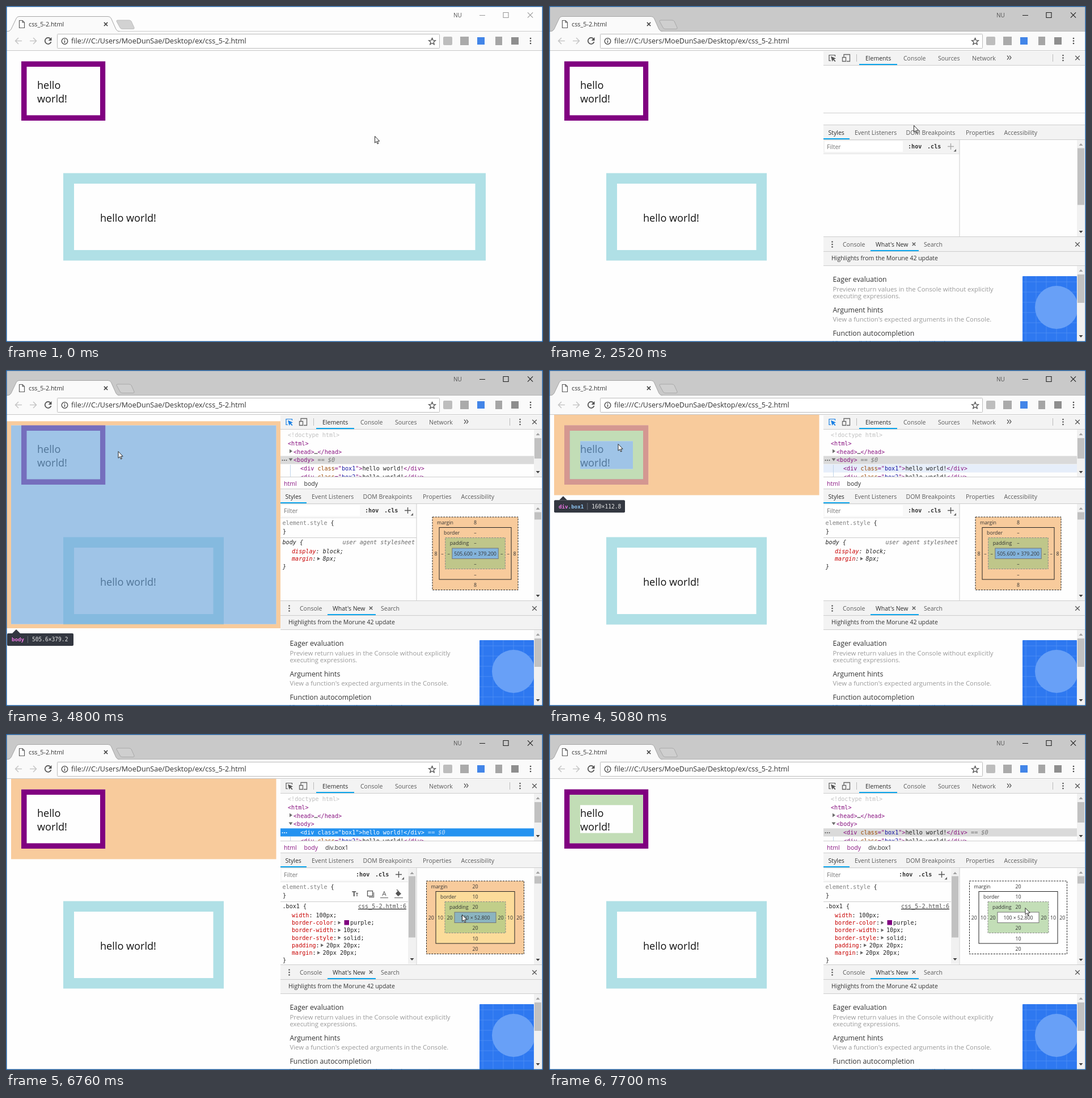
Write an HTML page that moves like this. It is 947 px wide and 592 px high and loops after 8000 ms.

```html
<!DOCTYPE html>
<html lang="en">
<head>
<meta charset="utf-8">
<title>CSS box model in the inspector</title>
<style>
  html, body { margin: 0; width: 100%; height: 100%; overflow: hidden; background: #fff; }
  svg { display: block; width: 100%; height: 100%; }
  text { white-space: pre; font-family: "Open Sans", "Noto Sans", sans-serif; }
  .m { font-family: "DejaVu Sans Mono", monospace; }
</style>
</head>
<body>
<svg id="stage" viewBox="0 0 947 592"></svg>
<script>
const LOOP = 8000;
const INK = '#2a2a2a', GREY = '#5a5a5a', LINE = '#cdcdcd', BAR = '#f3f3f3', BLUE = '#0ba5ec';
const TINT = {
  margin: 'rgba(246,178,107,.66)', border: 'rgba(255,229,153,.66)',
  padding: 'rgba(147,196,125,.55)', content: 'rgba(111,168,220,.66)'
};
const LAYERS = Object.keys(TINT);

// left, top, right, bottom
const BOX1 = {
  margin: [9, 79, 476.5, 220.5], border: [27, 97.5, 175.2, 202],
  padding: [36.5, 107, 166, 192.5], content: [55, 125.2, 148, 174.5]
};
const BODY = { margin: [1, 90.2, 484, 455], content: [9, 97.5, 476.5, 447.7] };

// time, x, y of the pointer tip
const POINTER = [
  [0, 650, 229], [990, 650, 208], [1400, 643, 210], [2920, 632, 187], [3070, 600, 150],
  [3190, 556, 118], [3310, 521, 101], [3460, 499, 94], [3580, 497, 93], [4290, 440, 112],
  [4410, 300, 118], [4530, 199, 122], [4680, 198, 134], [4800, 197.5, 143], [4950, 150, 134],
  [5080, 121.5, 130], [5510, 122, 136], [6460, 122.5, 136], [6620, 400, 207], [6760, 804, 318],
  [6890, 812, 320], [7000, 824, 316], [7150, 836, 288], [7280, 839.5, 308], [7420, 839.5, 306]
];

const rect = (x, y, w, h, fill, more = '') =>
  `<rect x="${x}" y="${y}" width="${w}" height="${h}" fill="${fill}" ${more}/>`;
const path = (d, stroke, width = 1, fill = 'none', more = '') =>
  `<path d="${d}" stroke="${stroke}" stroke-width="${width}" fill="${fill}" ${more}/>`;
const fillPath = (d, fill) => path(d, 'none', 0, fill, 'fill-rule="evenodd"');
const disc = (x, y, r, fill, more = '') => `<circle cx="${x}" cy="${y}" r="${r}" fill="${fill}" ${more}/>`;
const esc = s => s.replace(/&/g, '&amp;').replace(/</g, '&lt;');
const text = (x, y, s, size = 10.5, fill = GREY, more = '') =>
  `<text x="${x}" y="${y}" font-size="${size}" fill="${fill}" ${more}>${esc(s)}</text>`;
const mid = (x, y, s, size, fill) => text(x, y, s, size, fill, 'text-anchor="middle"');
// parts alternate between a string and its colour
function code(x, y, parts, more = '', size = 10.1) {
  let spans = '';
  for (let i = 0; i < parts.length; i += 2)
    spans += `<tspan fill="${parts[i + 1]}">${esc(parts[i])}</tspan>`;
  return `<text class="m" x="${x}" y="${y}" font-size="${size}" ${more}>${spans}</text>`;
}
const frame = ([l, t, r, b]) => `M${l} ${t}H${r}V${b}H${l}z`;
const ring = (outer, inner, fill) => fillPath(frame(outer) + (inner ? frame(inner) : ''), fill);
const cross = (x, y, r, color, w = 1.3) =>
  path(`M${x - r} ${y - r}L${x + r} ${y + r}M${x + r} ${y - r}L${x - r} ${y + r}`, color, w);
const dots = (x, y, color) => [-4.5, 0, 4.5].map(d => disc(x, y + d, 1.3, color)).join('');

function scrollbar(x, top, bottom, from, to) {
  const c = x + 7;
  return rect(x, top, 14, bottom - top, '#f1f1f1') + rect(x + 1, from, 12, to - from, '#c1c1c1') +
    fillPath(`M${c - 3.5} ${top + 10}h7l-3.5-4z`, '#a0a0a0') +
    fillPath(`M${c - 3.5} ${bottom - 10}h7l-3.5 4z`, '#404040');
}

function browser(active) {
  const key = active ? '#1e1e1e' : '#999';
  return rect(0, 0, 947, 45, active ? '#c9c9c9' : '#fdfdfd') +
    rect(0, 44, 947, 35, '#fafafa') + path('M1 44.5H946', active ? '#b4b4b4' : '#ccc') +
    path('M1 45Q7 45 9 41L18 22Q19.500 18.500 23 18.500H180Q184 18.500 185.500 22L194 41Q196 45 201 45',
      '#a6a6a6', 1, '#fafafa') + rect(2, 45, 943, 2, '#fafafa') +
    path('M197 25H217Q220 25 221 27L226 38Q227 40.500 224 40.500H205Q202 40.500 201 38L195 27Q194.500 25 197 25z',
      active ? '#a9a9a9' : '#bdbdbd', 1, active ? '#cfcfcf' : '#d2d2d2') +
    path('M23.500 25.500H29L32.500 29V38.500H23.500zM29 25.500V29H32.500', '#5c5c5c', 1.2, '#fff') +
    text(40, 35.5, 'css_5-2.html', 10.8, '#333') + cross(176, 32, 3.1, '#444', 1.5) +
    mid(796.5, 19.5, 'NU', 10, '#555') +
    path('M835 16.500H845M877 11.500H886V20.500H877z', key, 1.1) + cross(924.5, 16, 4.6, key, 1.1) +
    path('M28 61.500H17M22 56L16.500 61.500L22 67M42 61.500H53M48 56L53.500 61.500L48 67', '#c6c6c6', 1.5) +
    path('M78.500 58A5.500 5.500 0 1 0 79.500 63', '#505050', 1.7) +
    fillPath('M80.500 55V61H74.500z', '#505050') +
    rect(90.5, 49.5, 674, 25, '#fff', 'stroke="#bcbcbc" rx="1"') +
    disc(103.5, 62, 5.3, 'none', 'stroke="#444" stroke-width="1.3"') +
    path('M103.500 61V65M103.500 58.500V60', '#444', 1.4) +
    text(115, 66.3, 'file:///C:/Users/MoeDunSae/Desktop/ex/css_5-2.html', 12.58, '#333') +
    path('M751.500 56.500L753.100 60.500L757.500 60.800L754.100 63.500L755.200 67.700L751.500 65.400L747.800 67.700L748.900 63.500L745.500 60.800L749.900 60.500z',
      '#444', 1.2) +
    rect(771, 54, 16, 15, '#bdbdbd', 'rx="2"') + rect(801, 54, 15, 15, '#aaa') +
    rect(831, 55, 13, 13, '#4285e8') + rect(863, 54, 12, 15, '#a5a5a5') +
    rect(891, 55, 13, 13, '#8e8e8e') + dots(925, 61.5, '#4a4a4a') + path('M1 78.500H946', '#c8c8c8');
}

function page(t) {
  const right = t < 2520 ? 846 : 384;
  const hello = (x, y, s) => text(x, y, s, 18.1, '#111');
  return rect(0, 79, 947, 513, '#fefefe') +
    ring(BOX1.border, BOX1.padding, '#800080') + hello(55, 146, 'hello') + hello(55, 170, 'world!') +
    ring([101, 294.5, right, 448.5], [120, 313, right - 18.5, 430], '#b0e0e6') +
    hello(166, 379.5, 'hello world!');
}

function tip(x, y, name, size, width) {
  const bar = x + 14 + name[0].length * 5.6 + (name[2] || '').length * 5.6;
  return fillPath(`M${x + 9} ${y}L${x + 16} ${y - 7}L${x + 23} ${y}z`, '#333740') +
    rect(x, y, width, 22, '#333740', 'rx="2"') +
    code(x + 8, y + 14.3, name, 'font-weight="bold"', 9.2) +
    path(`M${bar} ${y + 5}V${y + 17}`, '#6c7078') +
    code(bar + 7.5, y + 14.3, [size, '#e4e4e4'], '', 9.6);
}

function overlay(t, mode) {
  if (t >= 4410 && t < 4950)
    return ring(BODY.margin, BODY.content, TINT.margin) + ring(BODY.content, null, TINT.content) +
      tip(2, 464, ['body', '#ee78e6'], '505.6×379.2', 117);
  const all = t >= 4950 && t < 5650;
  const shown = LAYERS.filter(k => all || k === mode.page);
  return shown.map(k => ring(BOX1[k], BOX1[LAYERS[LAYERS.indexOf(k) + 1]], TINT[k])).join('') +
    (all ? tip(9, 229.2, ['div', '#ee78e6', '.box1', '#8fc7f5'], '160×112.8', 125) : '');
}

function toolbar(t) {
  const picking = t >= 4010 && t < 5650;
  const pick = picking ? '#1a80e5' : '#555';
  const tabs = [[558, 'Elements', INK], [625, 'Console'], [686, 'Sources'], [746, 'Network']];
  return rect(484, 80, 461, 24, BAR) + path('M484 104.500H945', LINE) +
    path('M504.500 89V86.500H494V96.500H497', pick, 1.2) +
    fillPath('M497 88.500L506 92.500L502.500 93.800L505.500 97L504.300 98.300L501.200 95L499.500 98z', pick) +
    path('M520 91V85.500H530.500V97.500H525M517.500 90.500H523.500V97.500H517.500z', '#666', 1.3) +
    path('M542.500 85V98M888.500 85V98', '#bbb') +
    tabs.map(([x, s, c]) => text(x, 95.5, s, 10.5, c)).join('') + rect(547, 102, 67, 2, BLUE) +
    path('M808 87.500L811 91L808 94.500M812 87.500L815 91L812 94.500', '#555', 1.2) +
    dots(906.5, 91.5, '#555') + cross(932, 91.5, 3.8, '#555');
}

function tree(t) {
  if (t < 2650) return '';
  const picked = t >= 5650, bright = picked && t < 7700;
  const tag = '#881280', white = '#fff';
  const rowY = picked ? 166.3 : 151.5;
  const div = (y, name, on) => {
    const c = base => on ? white : base;
    const parts = ['<div ', c(tag), 'class', c('#994500'), '="', c(tag), name, c('#1a1aa6'),
      '">', c(tag), 'hello world!', c('#222'), '</div>', c(tag)];
    return code(519, y, parts);
  };
  const mark = (x, y) => code(x, y, [' == $0', bright ? '#c4e0fa' : '#777'], 'font-style="italic"');
  return `<g clip-path="url(#tree)">` +
    rect(484, rowY, 447, 14.2, bright ? '#2492f0' : '#dadada') +
    (t >= 5080 && t < 5650 ? rect(484, 166.3, 447, 14.2, '#e6eefa') : '') +
    [487.5, 491, 494.5].map(x => disc(x, rowY + 7.6, 1, bright ? white : '#555')).join('') +
    path('M501.500 181V188' + (picked ? '' : 'M501.500 167V181'), '#c0d4ea') +
    code(497, 118, ['<!doctype html>', '#c0c0c0']) + code(497, 133, ['<html>', tag]) +
    fillPath('M500 139.500V146.500L505 143z', '#6e6e6e') +
    code(507, 147.5, ['<head>', tag, '…', '#222', '</head>', tag]) +
    fillPath('M498.500 155.500H505.500L502 160.500z', '#6e6e6e') + code(507, 162, ['<body>', tag]) +
    div(177.2, 'box1', bright) + div(191.7, 'box2', false) +
    (picked ? mark(738, 177.2) : mark(543.5, 162)) +
    '</g>' + scrollbar(931, 105, 188, 120, 156);
}

function crumbs(t) {
  if (t < 2800) return '';
  const picked = t >= 5650;
  return (t < 4290 ? rect(519, 190, 38, 19, '#f0f0f0') : '') + text(490, 203.5, 'html', 10.5, '#881280') +
    text(525.5, 203.5, 'body', 10.5, picked ? '#881280' : INK) +
    (picked ? text(563, 203.5, 'div.box1', 10.5, INK) : '');
}

function styles(t) {
  const own = t >= 6060, dx = own ? -16 : 0;
  const prop = '#c80000', arrow = (x, y) => fillPath(`M${x} ${y - 6.500}v6l5-3z`, '#666');
  let out = rect(484, 236, 240, 24, t < 2650 ? BAR : '#f8f8f8') + rect(486, 238, 138, 19, '#fff') +
    text(490, 251.5, 'Filter', 10.5, '#757575') +
    code(633 + dx, 251, [':hov', '#333'], 'font-weight="bold"') +
    code(667 + dx, 251, ['.cls', '#333'], 'font-weight="bold"') +
    path(`M${703 + dx} 247.500h11M${708.5 + dx} 242v11`, t < 2650 ? '#aaa' : '#555', 1.4) +
    fillPath(`M${718 + dx} 252v4.500h-4.500z`, '#666') + path('M484 260.500H724', '#e4e4e4');
  if (t < 2800) return out;
  out += code(487.5, 272.5, ['element.style', '#808080', ' {', '#222']) + code(488, 288, ['}', '#222']) +
    path(`M484 295.500H${own ? 709 : 724}`, LINE);
  if (!own) {
    const it = 'font-style="italic"';
    return out + code(487.5, 307, ['body {', '#222'], it) +
      code(721, 307, ['user agent stylesheet', '#666'], it + ' text-anchor="end"') +
      code(504, 322.7, ['display', prop, ': block;', '#222'], it) +
      code(504, 336, ['margin', prop, ':', '#222'], it) + arrow(549, 336) +
      code(558.5, 336, ['8px;', '#222'], it) + code(488, 350, ['}', '#222'], it);
  }
  const rules = [['border-color', 'purple;'], ['border-width', '10px;'], ['border-style', 'solid;'],
    ['padding', '20px 20px;'], ['margin', '20px 20px;']];
  out += code(487.5, 307, ['.box1 {', '#222']) +
    code(706, 307, ['css_5-2.html:6', '#555'], 'text-anchor="end" text-decoration="underline"') +
    code(504, 322.7, ['width', prop, ': 100px;', '#222']);
  rules.forEach(([name, value], i) => {
    const y = 336 + i * 13.25, x = 506.5 + (name.length + 1) * 6.08;
    out += code(504, y, [name, prop, ':', '#222']) + arrow(x, y) +
      code(x + (i ? 9.5 : 21.5), y, [value, '#222']);
  });
  out += rect(596.5, 328, 8.5, 8.5, '#800080') + code(488, 402, ['}', '#222']);
  if (t < 6890)
    out += text(610, 286, 'T', 13, '#555', 'font-weight="bold"') + path('M617 280.500h4M619 280.500V286', '#555', 1.2) +
      rect(637.5, 276.5, 9, 9, '#fff', 'stroke="#555" stroke-width="1.3"') + path('M640 287.500H648.500V279', '#777', 1.4) +
      mid(667, 285, 'A', 11.5, '#555') + path('M660 288.500H674M685 288.500H700', '#888', 1.6) +
      fillPath('M687 281L691.500 276L697 281.500L691.500 286z', '#555') + path('M689 274L692 277', '#555', 1.2);
  return out + scrollbar(709, 237, 405, 250.5, 358.5);
}

function metrics(t, mode) {
  const own = t >= 6060, warm = t >= 4290 && !own;
  const half = own ? [86, 69.5, 53.5, 36.5] : [75.5, 63.5, 52.8, 40.7];
  const spans = [[259, 387.5], [277.5, 369], [295.5, 350.5], [314, 332.5]];
  const values = own ? ['20', '10', '20'] : ['8', '–', '–'];
  const strokes = ['#222', '#222', '#888', '#777'], c = 827.5;
  const num = (x, y, s) => mid(x, y, s, 8.8, '#333');
  let out = '';
  LAYERS.forEach((k, i) => {
    const [top, bottom] = spans[i], h = half[i];
    let fill = mode && mode !== k ? '#fff' : TINT[k];
    if (warm && k === 'border') fill = 'none';
    if (warm && k === 'content') fill = '#84b4dc';
    const dash = i % 2 ? '' : 'stroke-dasharray="3 1.8"';
    out += rect(c - h, top, h * 2, bottom - top, fill, `stroke="${strokes[i]}" ${dash}`);
    if (i === 3) return;
    const side = (h + half[i + 1]) / 2;
    out += text(c - h + 8, top + 12.5, k, 8.8, '#333') + num(c, top + 12.5, values[i]) +
      num(c, bottom - 5.5, values[i]) + num(c - side, 327, values[i]) + num(c + side, 327, values[i]);
  });
  return out + num(c, 327, own ? '100 × 52.800' : '505.600 × 379.200');
}

function drawer() {
  const notes = [[486, 'Eager evaluation'], [539.5, 'Argument hints'], [581, 'Function autocompletion']];
  const dim = (y, s) => text(500.5, y, s, 11.3, '#9a9a9a');
  let grid = '';
  for (let i = 0; i < 6; i++) grid += `M${841 + i * 18} 476V590M835 ${486 + i * 18}H931`;
  return rect(484, 406, 461, 51, BAR) + path('M484 406.500H945M484 432.500H945M484 457.500H945', LINE) +
    dots(499.5, 420, '#555') + text(518, 424, 'Console') + text(576, 424, "What's New", 10.5, INK) +
    cross(643.5, 419.5, 2.8, '#555') + text(661, 424, 'Search') + rect(567, 430, 85, 2, BLUE) +
    cross(932, 420, 3.8, '#555') + text(498, 448.3, 'Highlights from the Morune 42 update', 10.5, '#333') +
    notes.map(([y, s]) => text(500.5, y, s, 12.3, '#333')).join('') +
    dim(503, 'Preview return values in the Console without explicitly') + dim(515, 'executing expressions.') +
    dim(556, "View a function's expected arguments in the Console.") +
    dim(597.5, 'View available properties and methods as you type.') +
    rect(835, 476, 96, 115, '#2e78f0', 'rx="1"') + path(grid, '#5592f4', 0.7) +
    disc(895, 531, 38, '#68a0f7') + scrollbar(931, 458, 590, 473, 523);
}

function devtools(t, mode) {
  if (t < 2520) return '';
  const tabs = [[492.5, 'Styles', INK], [539, 'Event Listeners'], [629.5, 'DOM Breakpoints'],
    [735, 'Properties'], [802.5, 'Accessibility']];
  return rect(484, 79, 461, 512, '#fefefe') + toolbar(t) + tree(t) +
    path('M484 188.500H945M484 209.500H945', LINE) + crumbs(t) +
    rect(484, 210, 461, 25, BAR) + path('M484 235.500H945', LINE) +
    tabs.map(([x, s, c]) => text(x, 226.8, s, 10.5, c)).join('') + rect(484, 233, 46, 2, BLUE) +
    styles(t) + path('M724 236V406', LINE) +
    scrollbar(931, 236, 406, 250.5, t < 2920 ? 350.5 : 263.5) +
    (t < 2920 ? '' : metrics(t, mode)) + drawer();
}

function pointer(t) {
  const [, x, y] = POINTER.filter(p => p[0] <= t).pop();
  return path('M.5 .5V12.200L3.200 9.700L5.100 14L6.800 13.200L5 9.100H8.700z', '#111', 0.9, '#fff',
    `transform="translate(${x} ${y})"`);
}

// which layer is lit on the page and in the box diagram
function highlight(t) {
  if (t < 6760) return {};
  if (t < 6890) return { page: 'margin' };
  if (t < 7000) return { page: 'content', diagram: 'content' };
  if (t < 7150) return {};
  const name = t < 7280 ? 'border' : 'padding';
  return { page: name, diagram: name };
}

function draw(t) {
  const mode = highlight(t);
  return '<clipPath id="tree"><rect x="484" y="105" width="447" height="83"/></clipPath>' +
    page(t) + overlay(t, mode) + devtools(t, mode.diagram) + browser(t >= 1270) +
    rect(0.75, 0.75, 945.5, 590.5, 'none', 'stroke="#1f5c9c" stroke-width="1.5"') + pointer(t);
}

const stage = document.getElementById('stage');
let last = '';
function tick(now) {
  const next = draw(now % LOOP);
  if (next !== last) stage.innerHTML = last = next;
  requestAnimationFrame(tick);
}
tick(0);
</script>
</body>
</html>
```
